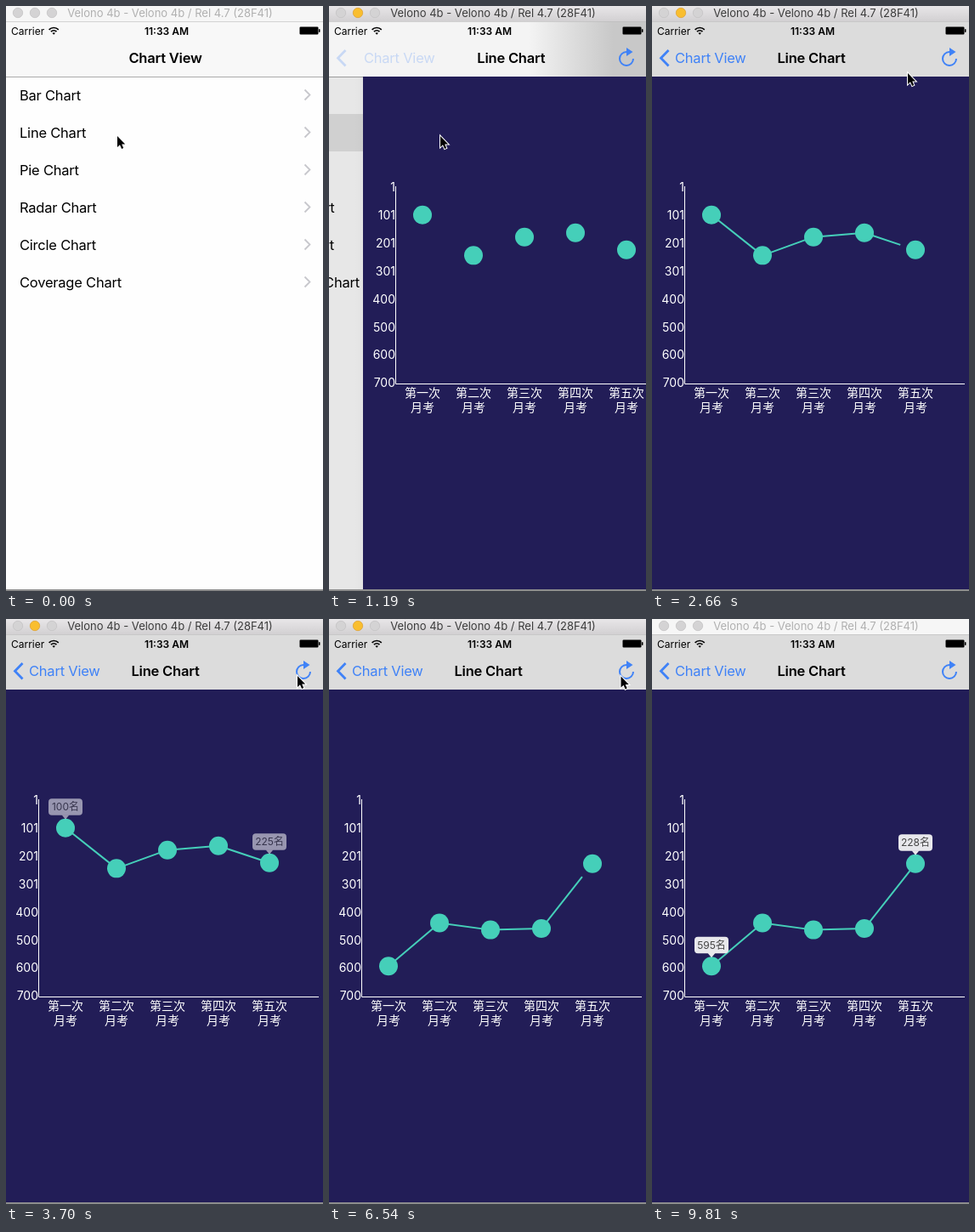
An HTML page that plays this animation: 373 by 688 pixels, repeating every 9.91 s.

```html
<!DOCTYPE html>
<html lang="en">
<head>
<meta charset="utf-8">
<title>Chart demo</title>
<style>
  html, body { margin: 0; width: 100%; height: 100%; overflow: hidden; background: #fff; }
  svg { display: block; width: 373px; height: 688px; font-family: Inter, "Noto Sans CJK SC", "Noto Sans CJK", sans-serif; }
  .row, .back { font-size: 16.5px; letter-spacing: -.22px; }
  .title { font-size: 16.5px; font-weight: 600; letter-spacing: -.2px; text-anchor: middle; }
  .status { font-size: 12px; }
  .axis { font-size: 14px; fill: #fff; text-anchor: end; }
  .exam { font-size: 14px; fill: #fff; text-anchor: middle; font-family: "Noto Sans CJK SC", "Noto Sans CJK", sans-serif; }
  .tip text { font-size: 12px; fill: #444; text-anchor: middle; }
  .blue { fill: #3f82f7; }
</style>
</head>
<body>
<svg viewBox="0 0 373 688">
  <defs>
    <linearGradient id="edge"><stop stop-opacity="0"/><stop offset="1" stop-opacity=".17"/></linearGradient>
    <linearGradient id="chrome" x2="0" y2="1"><stop stop-color="#e8e6e8"/><stop offset="1" stop-color="#d2d0d2"/></linearGradient>
    <linearGradient id="blur" gradientUnits="userSpaceOnUse" x1="0" x2="100">
      <stop stop-color="#f4f4f4"/><stop offset="1" stop-color="#c8c8c8"/>
    </linearGradient>
  </defs>

  <g id="list">
    <rect width="373" height="688" fill="#fefefe"/>
    <rect id="picked" y="127" width="373" height="44" fill="#d9d9d9"/>
  </g>
  <rect id="dim" width="373" height="688"/>

  <g id="page">
    <rect id="shade" x="-10" y="83" width="10" height="605" fill="url(#edge)"/>
    <rect y="83" width="380" height="605" fill="#221d57"/>
    <path d="M38.5 212V444.5H368" fill="none" stroke="#fff"/>
    <g id="labels"></g>
    <path id="line" pathLength="1" stroke-dasharray="1 2" fill="none" stroke="#45cfb9" stroke-width="2" stroke-linejoin="round"/>
    <g id="dots" fill="#45cfb9"></g>
    <g id="tips"></g>
  </g>

  <rect id="bar" y="18" width="373" height="65"/>
  <rect y="83" width="373" height="1" opacity=".33" id="hair"/>
  <text id="oldTitle" class="title" x="187.5" y="67">Chart View</text>
  <text id="newTitle" class="title" x="187.5" y="67">Line Chart</text>
  <g id="back">
    <path d="M19.5 52L10.5 61.2L19.5 70.5" fill="none" stroke="#3f82f7" stroke-width="2.8"/>
    <text id="backText" class="back blue" x="27" y="67">Chart View</text>
  </g>
  <g id="reload">
    <path d="M358 62A8 8 0 1 1 350 54" fill="none" stroke="#3f82f7" stroke-width="2"/>
    <path class="blue" d="M350 49L357.5 54L350 59Z"/>
  </g>

  <text class="status" x="6" y="33.5">Carrier</text>
  <g fill="none" stroke="#000" stroke-width="1.7">
    <path d="M50.6 27.8A8 8 0 0 1 61.8 27.8M52.9 30.2A4.8 4.8 0 0 1 59.5 30.2"/>
    <path d="M56.2 33.8L54.4 31.8Q56.2 30.6 58 31.8Z" fill="#000" stroke="none"/>
  </g>
  <text class="status" x="189" y="33.5" font-weight="600" text-anchor="middle">11:33 AM</text>
  <rect x="345.5" y="24.5" width="22" height="9" rx="1.5" fill="none" stroke="#000" stroke-opacity=".5"/>
  <rect x="346" y="25" width="21" height="8"/>
  <rect x="368" y="27" width="1.5" height="4" rx=".7"/>

  <rect id="head" width="373" height="18"/>
  <rect y="18" width="373" height="1" fill="#bbb" opacity=".6"/>
  <g id="lights" stroke-width=".8">
    <circle cx="14" cy="8" r="5.7"/><circle cx="34" cy="8" r="5.7"/><circle cx="54" cy="8" r="5.7"/>
  </g>
  <text id="caption" x="193" y="13" font-size="13" text-anchor="middle">Velono 4b - Velono 4b / Rel 4.7 (28F41)</text>
  <rect y="686" width="373" height="2" fill="#8d8d8d"/>

  <path id="cursor" d="M0 0V13L3 10.2L5.1 15L7.2 14L5.2 9.4H9.2Z" stroke="#fff" stroke-width="2" paint-order="stroke"/>
</svg>

<script>
const LOOP = 9910, STEP = 148.4;
const $ = id => document.getElementById(id);
const set = (id, attrs) => { for (const k in attrs) $(id).setAttribute(k, attrs[k]); };
const shift = (id, x, y = 0) => set(id, { transform: `translate(${x} ${y})` });
const clamp = v => Math.max(0, Math.min(1, v));

const charts = [
  { start: 1045, ranks: [100, 245, 179, 164, 225] },
  { start: 4890, ranks: [595, 440, 465, 460, 228] }
];
const dotX = i => 70 + 60 * i;
const rankY = v => 213.2 + (v - 1) * 0.3285;

// cursor stops: time, x, y
const stops = [
  [1980, 131, 153], [2078, 143, 148], [2671, 301, 79], [2970, 338, 68], [3260, 343, 67],
  [6000, 343, 67], [6980, 344, 68], [7123, 345, 90], [7580, 347, 492]
];

['Bar', 'Line', 'Pie', 'Radar', 'Circle', 'Coverage'].forEach((name, i) => {
  const y = 104.5 + 44 * i;
  $('list').innerHTML += `<text class="row" x="16" y="${y + 6}">${name} Chart</text>
    <path d="M351.5 ${y - 6}L357.5 ${y}L351.5 ${y + 6}" fill="none" stroke="#c7c7cc" stroke-width="1.8"/>`;
});
[1, 101, 201, 301, 400, 500, 600, 700].forEach((n, i) => {
  $('labels').innerHTML += `<text class="axis" x="38" y="${218 + 32.9 * i}">${n}</text>`;
});
[...'一二三四五'].forEach((n, i) => {
  $('labels').innerHTML += `<text class="exam" x="${dotX(i)}" y="460">第${n}次</text>
    <text class="exam" x="${dotX(i)}" y="476.5">月考</text>`;
});

function tip(i, rank) {
  return `<g class="tip" transform="translate(${dotX(i)} ${rankY(rank)})">
    <rect x="-20" y="-34.5" width="40" height="19.5" rx="4" fill="#e8e8ec"/>
    <path d="M-4.5 -15.5H4.5L0 -10Z" fill="#e8e8ec"/><text y="-20.5">${rank}名</text></g>`;
}

let shown;
function showChart(chart) {
  if (shown === chart) return;
  shown = chart;
  const r = chart.ranks;
  set('line', { d: 'M' + r.map((v, i) => `${dotX(i)} ${rankY(v)}`).join('L') });
  $('dots').innerHTML = r.map((v, i) => `<circle cx="${dotX(i)}" cy="${rankY(v)}" r="11"/>`).join('');
  $('tips').innerHTML = tip(0, r[0]) + tip(4, r[4]);
}

// cubic-bezier(.42, 0, .58, 1)
function easeInOut(x) {
  let lo = 0, hi = 1, s = 0.5;
  for (let i = 0; i < 20; i++) {
    s = (lo + hi) / 2;
    const q = 1 - s;
    if (1.26 * s * q * q + 1.74 * s * s * q + s ** 3 < x) lo = s; else hi = s;
  }
  return s * s * (3 - 2 * s);
}

function cursorAt(t) {
  if (t <= stops[0][0]) return stops[0].slice(1);
  for (let i = 1; i < stops.length; i++) {
    const [t0, x0, y0] = stops[i - 1], [t1, x1, y1] = stops[i];
    if (t <= t1) {
      const k = (t - t0) / (t1 - t0);
      return [x0 + (x1 - x0) * k, y0 + (y1 - y0) * k];
    }
  }
  return [-50, -50];
}

function drawWindow(active) {
  set('head', { fill: active ? 'url(#chrome)' : '#f6f6f6' });
  set('caption', { fill: active ? '#3c3c3c' : '#b0b0b0' });
  [...$('lights').children].forEach((c, i) => {
    const amber = active && i === 1;
    c.setAttribute('fill', amber ? '#f9be2f' : '#d4d3d4');
    c.setAttribute('stroke', amber ? '#dea236' : '#c4c3c4');
  });
}

// critically damped slide of the chart page over the list
function drawPush(t) {
  const w = Math.max(0, t - 1002.6) * 0.0206;
  const left = (1 + w) * Math.exp(-w), p = 1 - left, off = Math.round(373 * left);
  shift('page', off);
  set('shade', { opacity: p === 0 ? 0 : left });
  shift('list', Math.round(-112 * p));
  set('dim', { opacity: 0.1 * p });
  set('bar', { fill: p === 0 ? '#f8f8f8' : p > 0.95 ? '#dcdcdc' : 'url(#blur)' });
  set('blur', { gradientTransform: `translate(${225 + 0.24 * off} 0)` });
  set('hair', { width: off });
  shift('oldTitle', -85 * p);
  set('oldTitle', { opacity: clamp(1 - 2.4 * p) });
  shift('newTitle', 0.67 * off);
  set('newTitle', { opacity: clamp((p - 0.2) / 0.6) });
  shift('backText', 130 / 373 * off);
  set('back', { opacity: clamp((p - 0.86) / 0.14) });
  return p;
}

function draw(t) {
  drawWindow(t > 290 && t < 9790);
  const p = drawPush(t);
  set('picked', { opacity: t > 440 ? 1 - 0.35 * p : 0 });

  const chart = charts[t < 4890 ? 0 : 1], age = t - chart.start;
  showChart(chart);
  set('line', { 'stroke-dashoffset': 1 - easeInOut(clamp(age / 2000)) });
  set('tips', { opacity: clamp((age - 2485) / 300) });

  const pressed = t > 4590 && t < 5400;
  set('reload', { opacity: pressed ? clamp(0.27 + Math.max(0, t - 4900) / 450) : clamp(1.5 * p) });
  shift('cursor', ...cursorAt(t));
}

// time advances in coarse, even steps
function tick() {
  const t = performance.now() % LOOP;
  draw(Math.floor((t + 13) / STEP) * STEP);
  requestAnimationFrame(tick);
}
tick();
</script>
</body>
</html>
```
